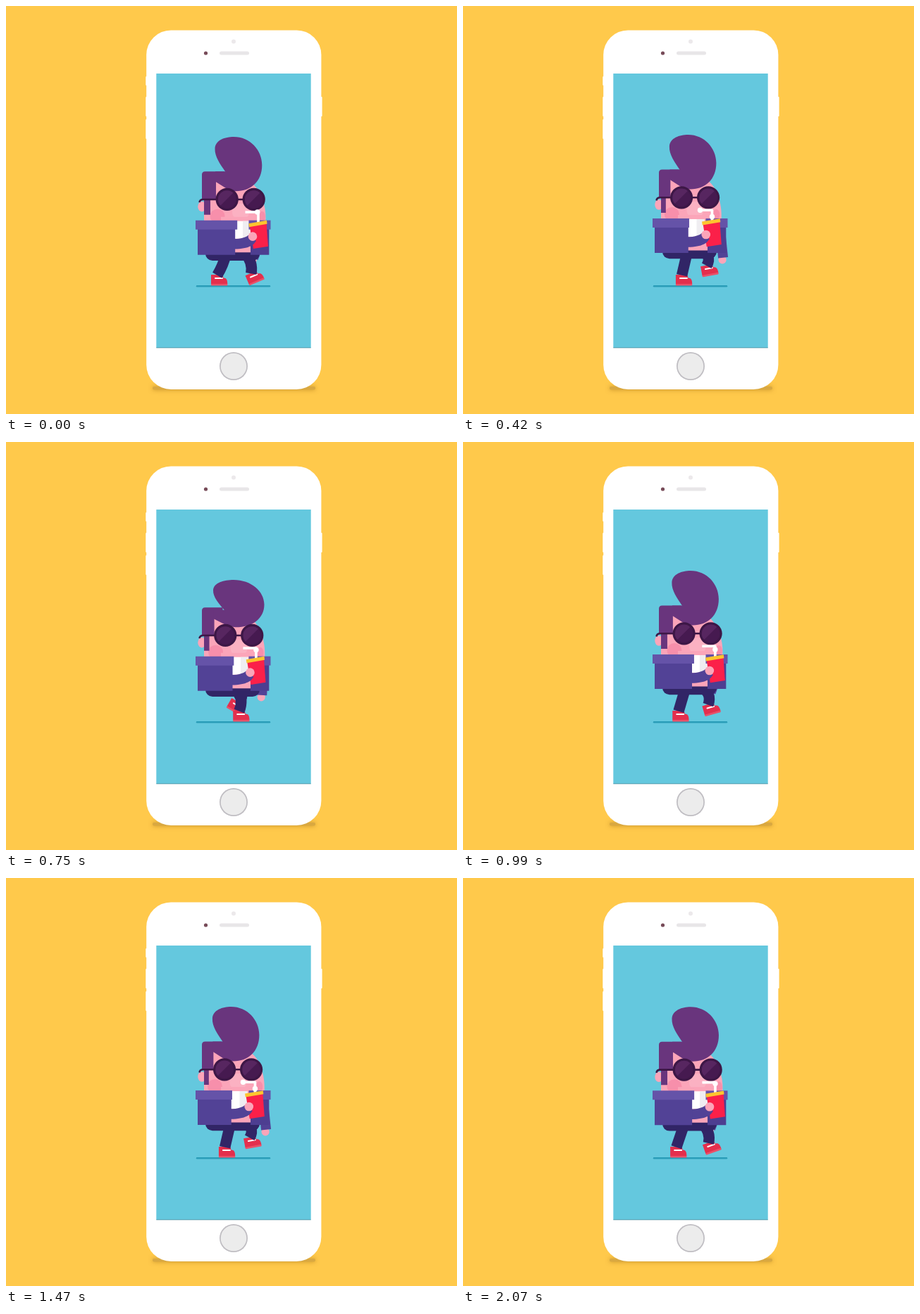
An HTML page with a canvas for the animation above (2.1 s loop, 640 px wide and 580 px high).

```html
<!DOCTYPE html>
<html lang="en">
<head>
<meta charset="utf-8">
<title>Walking with a drink</title>
<style>
html, body { margin: 0; width: 100%; height: 100%; overflow: hidden; background: #ffc94b; }
canvas { display: block; width: 640px; height: 580px; }
</style>
</head>
<body>
<canvas id="stage" width="640" height="580"></canvas>
<script>
const ctx = document.getElementById('stage').getContext('2d');
const LOOP = 2100, CYCLE = 1050, STEP = CYCLE / 2, TICK = 30;
const { PI, sin, cos, hypot, sqrt, max, floor } = Math;

const C = {
  wall: '#ffc94b', screen: '#64c8de', ground: '#2a9db8',
  hair: '#69357d', frame: '#3d1746', lens: '#461a50', glare: '#572660',
  skin: '#fba5b9', blush: '#f78fab', nose: '#fbb1c2',
  coat: '#524296', lid: '#6553a8', farCoat: '#4d3e91', pants: '#312566',
  shoe: '#e42f4d', sole: '#ea5068', cup: '#fb2049', rim: '#fdc42f'
};

// One smooth bump in every step, 0 outside of it
function bump(time, start, length) {
  const age = (time - start + STEP) % STEP;
  return age < length ? sin(PI * age / length) ** 2 : 0;
}

// Heel position and tilt: the planted foot slides back, then swings forward
function footPose(phase) {
  const back = 291, front = 345.6, floorY = 397.5, tilt = -23;
  if (phase < STEP) {
    return {
      x: front + (back - front) * phase / STEP,
      y: floorY,
      turn: tilt * max(0, 1 - phase / 60)
    };
  }
  const s = phase / STEP - 1;
  return {
    x: back + (front - back) * s * s * (3 - 2 * s),
    y: floorY - 20.5 * sin(PI * s),
    turn: tilt * s ** 3 + 32 * sin(PI * s / .9) ** 3
  };
}

function fill(color, path) {
  ctx.fillStyle = color;
  ctx.fill(new Path2D(path));
}
function line(color, width, path, cap = 'butt') {
  ctx.strokeStyle = color;
  ctx.lineWidth = width;
  ctx.lineCap = cap;
  ctx.lineJoin = 'round';
  ctx.stroke(new Path2D(path));
}
function box(color, x, y, w, h, r = 0) {
  ctx.fillStyle = color;
  ctx.beginPath();
  ctx.roundRect(x, y, w, h, r);
  ctx.fill();
}
function oval(color, x, y, rx, ry = rx) {
  ctx.fillStyle = color;
  ctx.beginPath();
  ctx.ellipse(x, y, rx, ry, 0, 0, 7);
  ctx.fill();
}
function shifted(x, y, draw) {
  ctx.save();
  ctx.translate(x, y);
  draw();
  ctx.restore();
}

function phone() {
  box(C.wall, 0, 0, 640, 580);
  ctx.save();
  ctx.shadowColor = 'rgba(140, 90, 0, .5)';
  ctx.shadowBlur = 6;
  box('#d9a841', 208, 541, 231, 4.5, 2);
  ctx.restore();
  box('#fff', 198.3, 100, 4, 13, 1);
  box('#fff', 198.3, 129, 4, 28, 1);
  box('#fff', 198.3, 161, 4, 28, 1);
  box('#fff', 444.6, 129, 4, 28, 1);
  box('#fff', 199.2, 34.4, 248.2, 510.6, 35);
  oval('#ece9eb', 323, 50.5, 3);
  oval('#774b58', 283.5, 67, 2.6);
  box('#e8e6e8', 303, 64.5, 42, 5, 2.5);
  oval('#bfbdc2', 323, 512, 20);
  oval('#ececec', 323, 512, 18.3);
  box(C.screen, 213.3, 96, 219.4, 390);
  box('#4a8c9c', 213.3, 485.4, 219.4, .9);
}

function leg(phase, rise) {
  const foot = footPose(phase), a = foot.turn * PI / 180;

  ctx.save();
  ctx.translate(foot.x, foot.y);
  ctx.rotate(a);
  fill(C.shoe, 'M0 -2V-15.5H16.5L17.5 -11C22 -11 23.3 -8 23.3 -2Z');
  box(C.sole, 0, -2.6, 23.3, 2.6, 1);
  line('#fff', 2, 'M6 -10.5H16', 'round');
  ctx.restore();

  // The knee bends forward as the hip comes closer to the ankle
  const ax = foot.x + 8.7 * cos(a) + 14.8 * sin(a);
  const ay = foot.y + 8.7 * sin(a) - 14.8 * cos(a);
  const hx = 328 + .55 * (ax - 328), hy = 352 + rise;
  const dx = ax - hx, dy = ay - hy, d = hypot(dx, dy);
  const bend = sqrt(max(34 * 34 - d * d, 0)) / 2;
  const kx = (hx + ax) / 2 + dy / d * bend, ky = (hy + ay) / 2 - dx / d * bend;
  line(C.pants, 15.5, `M${hx} ${hy}Q${kx} ${ky} ${ax} ${ay}`);
}

function farArm(sway) {
  const x = 360 - 10 * sway, y = 363 - sway;
  oval(C.skin, x, y, 5.6);
  line(C.coat, 14, `M365 322L${x + 1} ${y - 3}`);
}

function glasses() {
  const y = 275.3;
  line(C.frame, 2.6, `M300 ${y}H338`);
  for (const x of [313.7, 351.7]) {
    oval(C.frame, x, y, 16.1);
    oval(C.lens, x, y, 12.8);
    ctx.fillStyle = C.glare;
    ctx.beginPath();
    ctx.arc(x, y, 12.8, PI * .76, PI * 1.74);
    ctx.fill();
  }
}

function head(time, sway) {
  const s = 2 * (sway - 1), squash = bump(time, -25, 390);
  const cheek = 368.5 + s / 2;
  oval(C.skin, 278, 285.5, 5.7, 7.3);
  fill(C.skin, `M281 248H340C358 252 ${cheek} 280 ${cheek} 300V314H281Z`);
  shifted(s, 0, () => {
    oval(C.blush, 300, 299, 10.5, 10);
    oval(C.blush, 363, 300, 5, 8);
    oval(C.nose, 333, 293, 12);
  });
  fill(C.hair, `M278 240Q278 235.5 282.5 235.5H${310 + s}V250H${298 + s}V276`
    + `H${290 + s * .6}V297H281V276H278Z`);
  line(C.frame, 2.6, 'M274.5 279.5Q275 275.3 280 275.3H300');
  // The quiff is squeezed after each landing
  ctx.save();
  ctx.translate(297 + s, 264);
  ctx.scale(1 + .11 * squash, 1.02 - .165 * squash);
  ctx.translate(-297, -264);
  fill(C.hair, 'M311 236C304 226 296 215 296.5 204C297 192 311 187.5 323 187.5'
    + 'C346 187.5 363 206 363 227C363 250 347 264 325 263.5L316 262L297 250V236Z');
  ctx.restore();
  shifted(s, 0, glasses);
}

function straw(time) {
  const speed = .1, every = CYCLE / 4, lip = 339.5, bendX = 358, bendY = 293.3, up = 15;
  line('#fff', 3.6, `M${lip} ${bendY}H${bendX}V309`);
  // Gulps travel from the cup to the lips
  const age = (time - 100 + CYCLE) % every;
  for (const d of [age * speed, (age + every) * speed]) {
    if (d > up + bendX - lip) continue;
    oval('#fff', d < up ? bendX : bendX - d + up, d < up ? bendY + up - d : bendY, 3.7);
  }
}

function body(time, sway) {
  const s = sway - 1;
  box(C.skin, 305, 300, 43, 50.5);
  shifted(s * 2.5, 0, () => {
    fill('#fff', 'M318 306H347V322Q343 331 330 331H318Z');
    fill('#efedf1', 'M336 306H347V322Q344 328 336 330Z');
  });
  box(C.farCoat, 347, 317, 26.3, 37);
  box(C.lid, 344.5, 305, 31, 13);
  shifted(s * 2.5, 0, () => straw(time));
  shifted(s * 2.9, 0, () => {
    fill(C.cup, 'M345.5 311L369.5 307.5L372 342L351 345.3Z');
    fill(C.rim, 'M344.3 309.5L370 305.2L370.6 310.2L345 314.5Z');
    fill(C.coat, 'M316 331C332 332 339 330 344 326L355 334C350 343 340 346 316 346Z');
    oval(C.skin, 350, 328, 6.3);
  });
  box(C.coat, 272, 316, 53.2 + s * 3, 38);
  box(C.lid, 269, 305, 59.2 + s * 4, 13);
}

function render(ms) {
  const time = floor(ms % LOOP / TICK) * TICK % CYCLE;
  const sway = cos(time / CYCLE * 2 * PI);
  const rise = 14 * bump(time, -45, 315) - 3;

  phone();
  line(C.ground, 2.4, 'M271 398.3H374', 'round');
  shifted(0, rise, () => farArm(sway));
  leg(time, rise);
  leg((time + STEP) % CYCLE, rise);
  shifted(0, rise, () => {
    box(C.pants, 283, 346, 77, 16.3, [0, 0, 10, 10]);
    head(time, sway);
    body(time, sway);
  });
}

const start = performance.now();
function tick() {
  render(performance.now() - start);
  requestAnimationFrame(tick);
}
tick();
</script>
</body>
</html>
```
